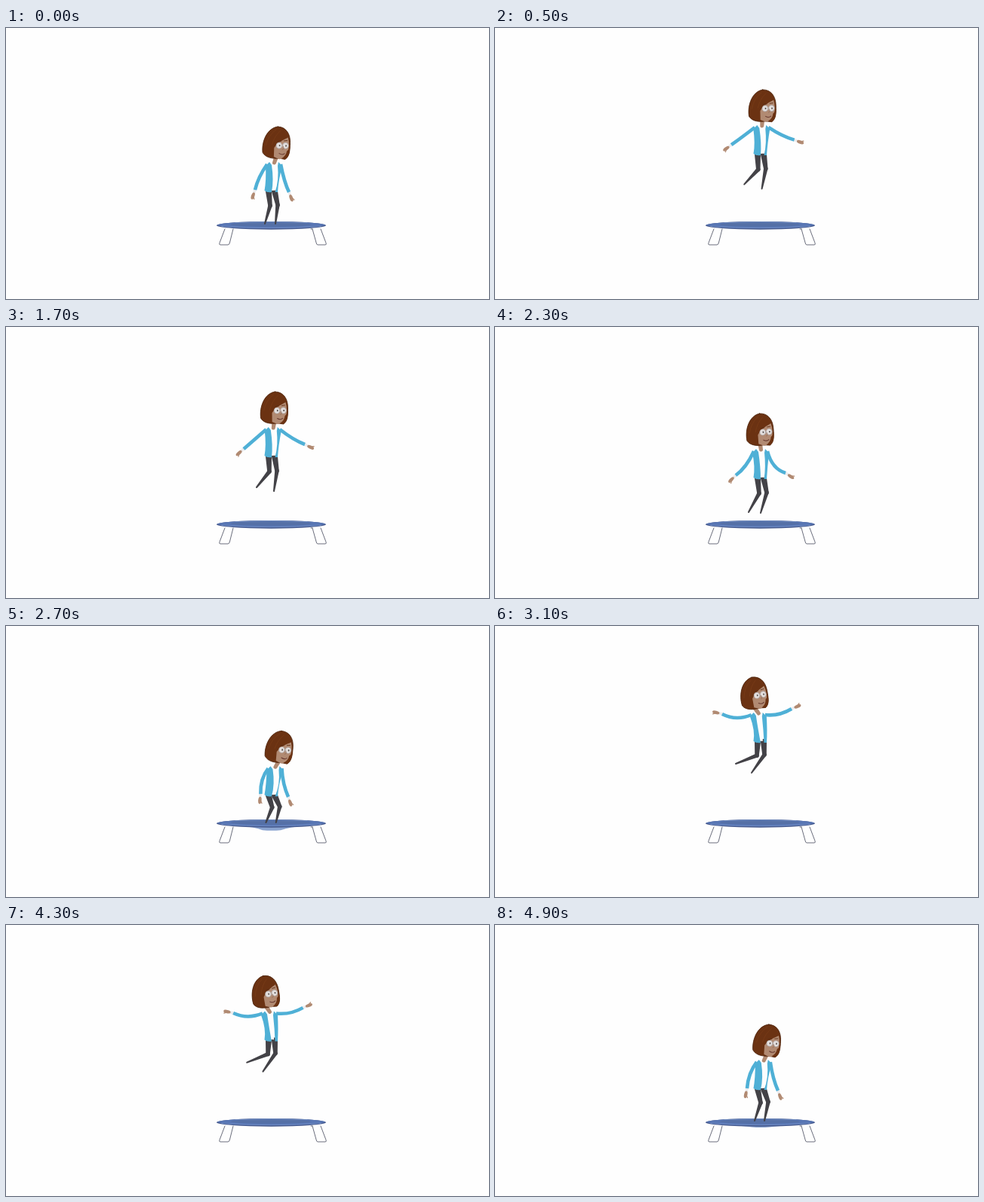
Recreate the animation shown at these times as an HTML page with a canvas. Size 640 by 360 pixels, loop 5 s.

```html
<!DOCTYPE html>
<html lang="en">
<head>
<meta charset="utf-8">
<title>Trampoline</title>
<style>
html, body { margin: 0; width: 100%; height: 100%; overflow: hidden; background: #fefefe; }
canvas { display: block; width: 640px; height: 360px; }
</style>
</head>
<body>
<canvas id="stage" width="640" height="360"></canvas>
<script>
const ctx = document.getElementById('stage').getContext('2d');
const LOOP = 5000, STEP = 100, BOUNCE = 1220, APEX = 590;
const SKIN = '#b18a72', HAIR = '#6b3212', BLUE = '#4fb0d6', TROUSERS = '#434247';

// Phase after the apex, head x, head top, left elbow, left wrist,
// right elbow, right wrist, left knee, left foot, right foot
const POSES = [
  [70, 343, 68, 320, 122, 301, 117, 376, 117, 393, 110, 347, 172, 319, 183, 340, 195],
  [490, 351, 115, 332, 184, 319, 197, 370, 184, 385, 194, 350, 221, 336, 246, 352, 247],
  [510, 352, 127, 333, 195, 320, 210, 369, 194, 384, 207, 348, 234, 337, 258, 353, 258],
  [630, 358.5, 131, 336, 198, 330, 215, 369, 202, 375, 218, 350, 236, 343, 260, 357, 260],
  [650, 360.5, 132, 338, 198, 334, 217, 369, 203, 375, 220, 352, 236, 344, 260, 357, 260],
  [770, 365.5, 141, 343, 205, 347, 226, 367, 210, 370, 229, 355, 240, 345, 261, 358, 261],
  [1000, 358, 129, 335, 195, 325, 211, 371, 199, 381, 214, 350, 234, 342, 260, 357, 260],
  [1110, 355.5, 86, 331, 148, 315, 162, 380, 148, 396, 156, 349, 192, 332, 213, 355, 218]
];

function key(i) {
  const n = POSES.length, pose = POSES[(i + n) % n];
  return [pose[0] + Math.floor(i / n) * BOUNCE, ...pose.slice(1)];
}

// Smooth periodic curve through the poses
function poseAt(t) {
  let p = (((t - APEX) % BOUNCE) + BOUNCE) % BOUNCE;
  if (p < POSES[0][0]) p += BOUNCE;
  let i = 0;
  while (key(i + 1)[0] <= p) i++;
  const [a, b, c, d] = [i - 1, i, i + 1, i + 2].map(key);
  const len = c[0] - b[0], u = (p - b[0]) / len, v = 1 - u;
  return b.slice(1).map((from, k) => {
    const j = k + 1;
    const m0 = (c[j] - a[j]) / (c[0] - a[0]) * len;
    const m1 = (d[j] - b[j]) / (d[0] - b[0]) * len;
    return v * v * (1 + 2 * u) * from + u * v * v * m0
      + u * u * (3 - 2 * u) * c[j] - u * u * v * m1;
  });
}

function fill(path, color) {
  ctx.fillStyle = color;
  ctx.fill(new Path2D(path));
}

function line(path, color, width) {
  ctx.strokeStyle = color;
  ctx.lineWidth = width;
  ctx.stroke(new Path2D(path));
}

function oval(x, y, rx, ry, color, turn = 0) {
  ctx.beginPath();
  ctx.ellipse(x, y, rx, ry, turn, 0, Math.PI * 2);
  ctx.fillStyle = color;
  ctx.fill();
}

function taper(x1, y1, w1, x2, y2, w2, color) {
  const a = Math.atan2(y2 - y1, x2 - x1) + Math.PI / 2;
  ctx.beginPath();
  ctx.arc(x1, y1, w1 / 2, a, a + Math.PI);
  ctx.arc(x2, y2, w2 / 2, a + Math.PI, a);
  ctx.fillStyle = color;
  ctx.fill();
}

function leg(hx, hy, kx, ky, fx, fy) {
  taper(hx, hy, 8, kx, ky, 5.5, TROUSERS);
  taper(kx, ky, 5.5, fx, fy, 2, TROUSERS);
}

function arm(sx, sy, ex, ey, wx, wy) {
  const a = Math.atan2(wy - ey, wx - ex), c = Math.cos(a), s = Math.sin(a);
  taper(wx, wy, 4, wx + c * 4, wy + s * 4, 3.5, '#ececee');
  oval(wx + c * 8.5, wy + s * 8.5, 4.8, 2.2, SKIN, a);
  line(`M${wx + c * 7} ${wy + s * 7}l${c * 5 + s * 3} ${s * 5 - c * 3}`, SKIN, 1.2);
  ctx.lineCap = 'butt';
  const cx = 2 * ex - (sx + wx) / 2, cy = 2 * ey - (sy + wy) / 2;
  line(`M${sx} ${sy}Q${cx} ${cy} ${wx} ${wy}`, BLUE, 4.6);
  ctx.lineCap = 'round';
}

function trampoline(sag) {
  const steel = '#6a6d7c';
  line('M290 267L283 285.500Q282 288 284 288H294Q296 288 296.500 285L301 267', steel, 1);
  line('M404 267H406M417 267L424 285.500Q425 288 423 288H413Q411.500 288 411 285L406 267', steel, 1);
  if (sag > 0) {
    fill(`M306 265Q330 267 340 ${267 + sag}Q352 ${268 + sag} 364 ${267 + sag}Q376 267 398 265Z`, '#8ba4d0');
  }
  oval(351.5, 262.3, 72.5, 5.4, '#43578c');
  oval(351.5, 261.6, 71, 4.3, '#5876b4');
  oval(351, 261, 53, 2.8, '#5570a6');
  line('M286 263.500Q351 268 417 263.500', '#6f8cc4', 1);
  line('M304 258.500Q351 256.500 399 258.500', '#7792c4', 0.8);
}

function head(x, top) {
  ctx.save();
  ctx.translate(x, top + 22);
  ctx.rotate((x - 356) * 0.014);
  ctx.translate(0, -22);
  const hair = 'M1 0C12 0 18 9 18 21C18 31 18 39 12 43L4 42C-4 43 -14 42 -18 35C-20 20 -13 2 1 0Z';
  fill(hair, HAIR);
  line(hair, '#4b220b', 0.8);
  fill('M15 14C10 17 3 19 -3 28L-3 40L4 43C10 43 13 39 15 34Q18 24 15 14Z', SKIN);
  fill('M14 32Q18 29 18 25C18 34 17 40 12 43L7 42Q13 39 14 32Z', HAIR);
  line('M-1 4Q-11 11 -14 25M5 5Q-3 12 -6 24', '#7a3d18', 0.7);
  for (const ex of [3.5, 12]) {
    oval(ex, 25, 4.2, 4.3, '#b9b5b6');
    oval(ex, 25, 3.2, 3.4, '#e5e0de');
    oval(ex + 0.7, 25, 0.9, 1.2, '#55504f');
  }
  line('M1 19.500Q3 18 6 19M10 18.500L14 18', '#5a2c14', 0.8);
  line('M9 26Q11 30 8 30.500', '#8d6955', 0.7);
  line('M4 35.500Q8 38 11 35.500', '#683a30', 1.1);
  ctx.restore();
}

function torso(x, y) {
  const hem = y + 40;
  fill(`M${x - 6} ${y}L${x + 6} ${y}L${x + 6} ${hem - 2}Q353 ${hem - 3} 347 ${hem - 1}Z`, '#fdfdfd');
  fill(`M${x - 6} ${y}L${x - 3} ${y + 4}Q${x} ${y + 24} 352 ${hem}Q346 ${hem + 1} 342.500 ${hem - 2}
    Q345 ${y + 24} ${x - 11} ${y + 5}Z`, BLUE);
  fill(`M${x + 6} ${y}L${x + 11} ${y + 5}Q361 ${y + 24} 360 ${hem}L356.500 ${hem}
    Q${x + 7} ${y + 24} ${x + 5} ${y + 5}Z`, BLUE);
}

function draw(t) {
  const [hx, top, elx, ely, wlx, wly, erx, ery, wrx, wry, kx, ky, flx, fly, frx, fry] = poseAt(t);
  const sx = 355 + (hx - 358.5) * 0.4, sy = top + 47, hip = top + 86;
  ctx.fillStyle = '#fefefe';
  ctx.fillRect(0, 0, 640, 360);
  trampoline(top > 131 ? 1.5 * Math.sqrt(top - 131) : 0);
  leg(348, hip, kx, ky, flx, Math.min(fly, 261));
  leg(356, hip, kx + 10, ky - 1, frx, Math.min(fry, 261));
  torso(sx, sy);
  arm(sx - 9, sy + 3, elx, ely, wlx, wly);
  arm(sx + 9, sy + 3, erx, ery, wrx, wry);
  taper(hx, top + 39, 6, sx + 0.5, sy + 1, 5, SKIN);
  head(hx, top);
}

ctx.lineCap = ctx.lineJoin = 'round';
const start = performance.now();
function tick() {
  const t = (performance.now() - start) % LOOP;
  draw(Math.floor(t / STEP) * STEP);
  requestAnimationFrame(tick);
}
tick();
</script>
</body>
</html>
```
